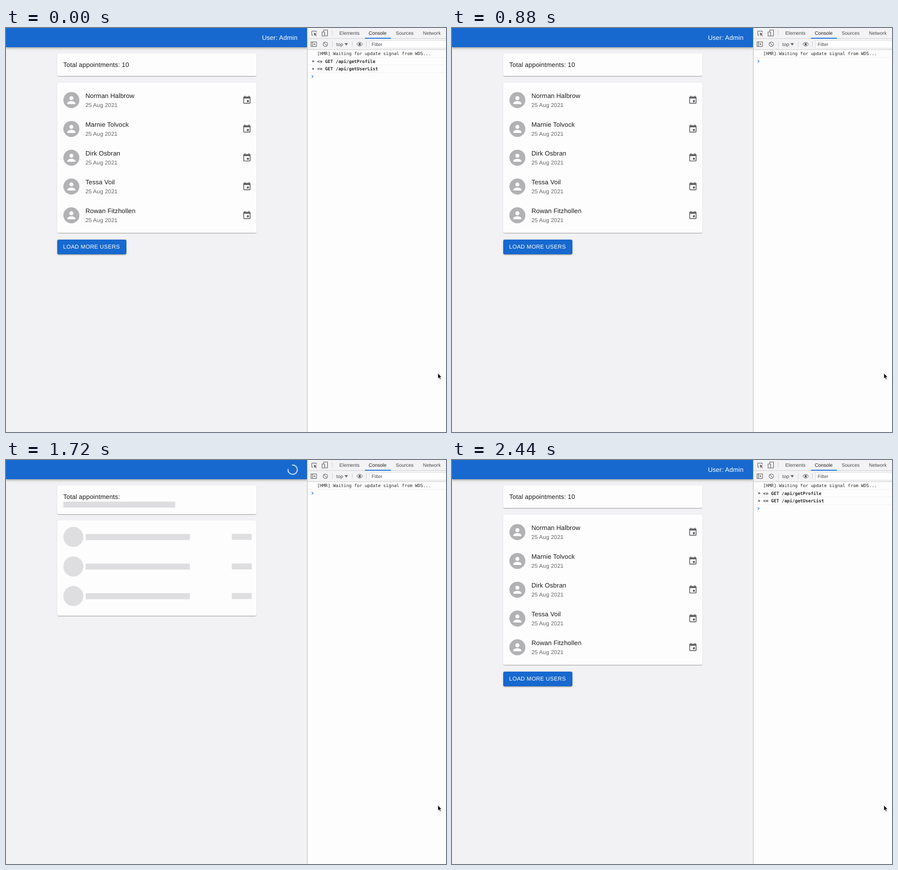
An HTML page for the animation above (3520 ms loop, 782 by 716 pixels).

```html
<!DOCTYPE html>
<html lang="en">
<head>
<meta charset="utf-8">
<title>Appointments</title>
<style>
  html, body { margin: 0; width: 100%; height: 100%; overflow: hidden; background: #f2f1f3; }
  #stage { position: relative; width: 782px; height: 716px; overflow: hidden; background: #f2f1f3; }
  #stage > * { position: absolute; }
  .bar { left: 0; top: 0; width: 536px; height: 34px; background: #1769cf;
    box-shadow: 0 1.4px 2.8px -.7px rgba(0,0,0,.2), 0 2.8px 3.6px rgba(0,0,0,.14), 0 .7px 7px rgba(0,0,0,.12); }
  .card { left: 90.6px; width: 354.8px; background: #fefdfe; border-radius: 2.8px;
    box-shadow: 0 1.4px .7px -.7px rgba(0,0,0,.2), 0 .7px .7px rgba(0,0,0,.14), 0 .7px 2.1px rgba(0,0,0,.12); }
  .button { left: 90.6px; top: 375px; width: 123.4px; height: 26px; background: #1769cf; border-radius: 2.8px;
    box-shadow: 0 2.1px .7px -1.4px rgba(0,0,0,.2), 0 1.4px 1.4px rgba(0,0,0,.14), 0 .7px 3.6px rgba(0,0,0,.12); }
  .tools { left: 535px; top: 0; width: 247px; height: 716px; background: #fefdfe; }
  svg { left: 0; top: 0; }
  text { font-family: "Liberation Sans", Arial, sans-serif; text-rendering: geometricPrecision; white-space: pre; }
  .body { font-size: 11.38px; letter-spacing: .00938em; fill: #1c1c1c; }
  .date { font-size: 9.95px; letter-spacing: .01071em; fill: #666; }
  .label { font-size: 9.95px; letter-spacing: .02857em; fill: #fff; }
  .ui { font-size: 8.6px; fill: #4a4b4e; }
  .log { font: 7.82px "DejaVu Sans Mono", monospace; fill: #2a2a2a; }
  .bold { font-weight: bold; }
  .line { fill: none; stroke: #66686b; stroke-width: 1; }
</style>
</head>
<body>
<div id="stage">
  <div class="bar"></div>
  <div class="card" id="total" style="top:45.4px"></div>
  <div class="card" id="users"></div>
  <div class="button" id="more"></div>
  <div class="tools"></div>
  <svg width="782" height="716" viewBox="0 0 782 716">
    <defs>
      <linearGradient id="wave">
        <stop offset="0" stop-opacity="0"/>
        <stop offset=".5" stop-opacity=".05"/>
        <stop offset="1" stop-opacity="0"/>
      </linearGradient>
      <path id="person" d="M12 12c2.21 0 4-1.79 4-4s-1.79-4-4-4-4 1.79-4 4 1.79 4 4 4zm0 2c-2.67 0-8 1.34-8 4v2h16v-2c0-2.66-5.33-4-8-4z"/>
      <path id="event" d="M17 12h-5v5h5v-5zM16 1v2H8V1H6v2H5c-1.11 0-1.99.9-1.99 2L3 19c0 1.1.89 2 2 2h14c1.1 0 2-.9 2-2V5c0-1.1-.9-2-2-2h-1V1h-2zm3 18H5V8h14v11z"/>
    </defs>

    <text id="user" class="body" x="455" y="21.4" style="fill:#fff">User: Admin</text>
    <g transform="translate(509.5 17.2) scale(.409)">
      <g id="spin"><circle id="arc" r="20.2" fill="none" stroke="#fff" stroke-width="3.6"/></g>
    </g>
    <text id="sum" class="body" x="101.8" y="69.1"></text>
    <g id="list"></g>
    <g id="bones" fill="#dedddf"></g>
    <g id="shine" fill="url(#wave)"></g>

    <!-- developer tools -->
    <rect x="535" width="247" height="38.5" fill="#f3f2f4"/>
    <path d="M535.5 0V716" stroke="#c2c1c4"/>
    <path d="M536 18.7H782M536 38.4H782" stroke="#cbcacd" stroke-width=".8"/>
    <path d="M579.7 4V14M580 23.5V33.5M615.5 23.5V33.5M640.5 23.5V33.5" stroke="#cccbce" stroke-width=".8"/>
    <rect x="638" y="17.4" width="46" height="1.6" fill="#1a6fd8"/>
    <rect x="646.5" y="22.4" width="140" height="13" fill="#fff" stroke="#dddcdf" stroke-width=".7"/>
    <g class="ui">
      <text x="592.5" y="12.3">Elements</text>
      <text x="644.7" y="12.3" style="fill:#222">Console</text>
      <text x="692.7" y="12.3">Sources</text>
      <text x="741" y="12.3">Network</text>
      <text x="587" y="31.6">top</text>
      <text x="649.8" y="31.8">Filter</text>
    </g>
    <path d="M601.7 26.8h6l-3 4.4z" fill="#66686b"/>
    <g class="line">
      <path d="M551.3 8V5.5H543.5V12.7H546"/>
      <path d="M564.5 6V3.5H571.5V14H567"/>
      <rect x="561.8" y="7" width="4.6" height="7.2"/>
      <rect x="542.2" y="24.7" width="9.6" height="8"/>
      <path d="M544.7 24.7V32.7"/>
      <circle cx="567.6" cy="28.8" r="4"/>
      <path d="M564.8 26L570.4 31.6"/>
      <path d="M623.4 28.7Q628.6 21.8 633.8 28.7Q628.6 35.6 623.4 28.7Z"/>
    </g>
    <path d="M547 8.2l5.6 2.2-2.4 1 2 2.2-.9.8-2-2.2-1.1 2.2z" fill="#66686b"/>
    <path d="M547.2 26.8l2.8 1.9-2.8 1.9z" fill="#66686b"/>
    <circle cx="628.6" cy="28.7" r="2" fill="#55575a"/>
    <g id="logs"></g>
    <path id="prompt" d="M543.4 -2.2L545.7 0L543.4 2.2" fill="none" stroke="#3b82e0" stroke-width="1.2"/>
    <path d="M767.6 611.8V621.6L769.8 619.6L771.3 623L772.9 622.3L771.4 619H774.3Z" fill="#000" stroke="#fff" stroke-width=".7"/>
  </svg>
</div>
<script>
const LOOP = 3520, STEP = 40;
const CLEAR = 320, RELOAD = 720, MOUNT = 920, PROFILE = 1840, LOADED = 1960;
const ROW = 13.5;
const $ = id => document.getElementById(id);
const show = (el, on) => { el.style.display = on ? '' : 'none'; };

const names = ['Norman Halbrow', 'Marnie Tolvock', 'Dirk Osbran', 'Tessa Voil', 'Rowan Fitzhollen'];
$('list').innerHTML = names.map((name, i) => `
  <g transform="translate(0 ${i * 51.05})">
    <circle cx="116.2" cy="127.8" r="14.2" fill="#b2b1b3"/>
    <use href="#person" transform="translate(105.53 117.1) scale(.889)" fill="#fff"/>
    <text class="body" x="141.2" y="124.3">${name}</text>
    <text class="date" x="141.2" y="140">25 Aug 2021</text>
    <use href="#event" transform="translate(419.6 119.3) scale(.711)" fill="#626163"/>
  </g>`).join('') + '<text class="label" x="101.6" y="391.2">LOAD MORE USERS</text>';

const bar = (x, y, w) => `<rect x="${x}" y="${y}" width="${w}" height="10.7"/>`;
let bones = bar(101.9, 73.7, 198.7);
for (let i = 0; i < 3; i++) {
  const y = 136.3 + i * 52.4;
  bones += `<circle cx="119.7" cy="${y}" r="17.8"/>` + bar(141.7, y - 5.1, 185.1) + bar(401.4, y - 5.4, 35.4);
}
$('bones').innerHTML = $('shine').innerHTML = bones;

const logs = ['[HMR] Waiting for update signal from WDS...', '<= GET /api/getProfile', '<= GET /api/getUserList'];
logs.forEach((line, i) => {
  const y = 45.4 + i * ROW;
  $('logs').insertAdjacentHTML('beforeend', `<g>
    <path d="M536 ${y + 6.6}H782" stroke="#efeef0" stroke-width=".8"/>
    ${i ? `<path d="M544.6 ${y - 2.2}l3.6 2.2-3.6 2.2z" fill="#5c5c5e"/>` : ''}
    <text class="log ${i ? 'bold' : ''}" x="553" y="${y + 2.8}">${line.replace('<', '&lt;')}</text></g>`);
});

const timing = { duration: 1400, iterations: Infinity, fill: 'both' };
const turns = [
  $('spin').animate([{ transform: 'rotate(0deg)' }, { transform: 'rotate(360deg)' }], timing),
  $('arc').animate([
    { strokeDasharray: '1px, 200px', strokeDashoffset: '0px', easing: 'ease-in-out' },
    { strokeDasharray: '100px, 200px', strokeDashoffset: '-15px', easing: 'ease-in-out' },
    { strokeDasharray: '100px, 200px', strokeDashoffset: '-125px' }
  ], timing)
];
turns.forEach(a => a.pause());

function logCount(t) {
  if (t < CLEAR || t >= LOADED) return 3;
  if (t < RELOAD) return 0;
  return t < PROFILE ? 1 : 2;
}

function draw(now) {
  const t = Math.floor(now % LOOP / STEP) * STEP;
  const ready = t < MOUNT || t >= LOADED;
  const known = ready || t >= PROFILE;

  show($('list'), ready);
  show($('more'), ready);
  show($('bones'), !ready);
  show($('shine'), !ready && known);
  show($('user'), known);
  show($('spin'), !known);
  $('sum').textContent = 'Total appointments:' + (ready ? ' 10' : '');
  $('total').style.height = ready ? '39.7px' : '50.4px';
  $('users').style.top = ready ? '96.6px' : '107.3px';
  $('users').style.height = ready ? '266.6px' : '168.7px';

  turns.forEach(a => { a.currentTime = Math.max(0, t - MOUNT + 2); });
  const sweep = Math.min(1, (t - MOUNT - 500) / 800) * 2 - 1;
  $('wave').setAttribute('gradientTransform', `translate(${sweep} 0)`);

  const count = logCount(t);
  [...$('logs').children].forEach((g, i) => show(g, i < count));
  $('prompt').setAttribute('transform', `translate(0 ${45.4 + count * ROW})`);
  requestAnimationFrame(draw);
}
draw(performance.now());
</script>
</body>
</html>
```
